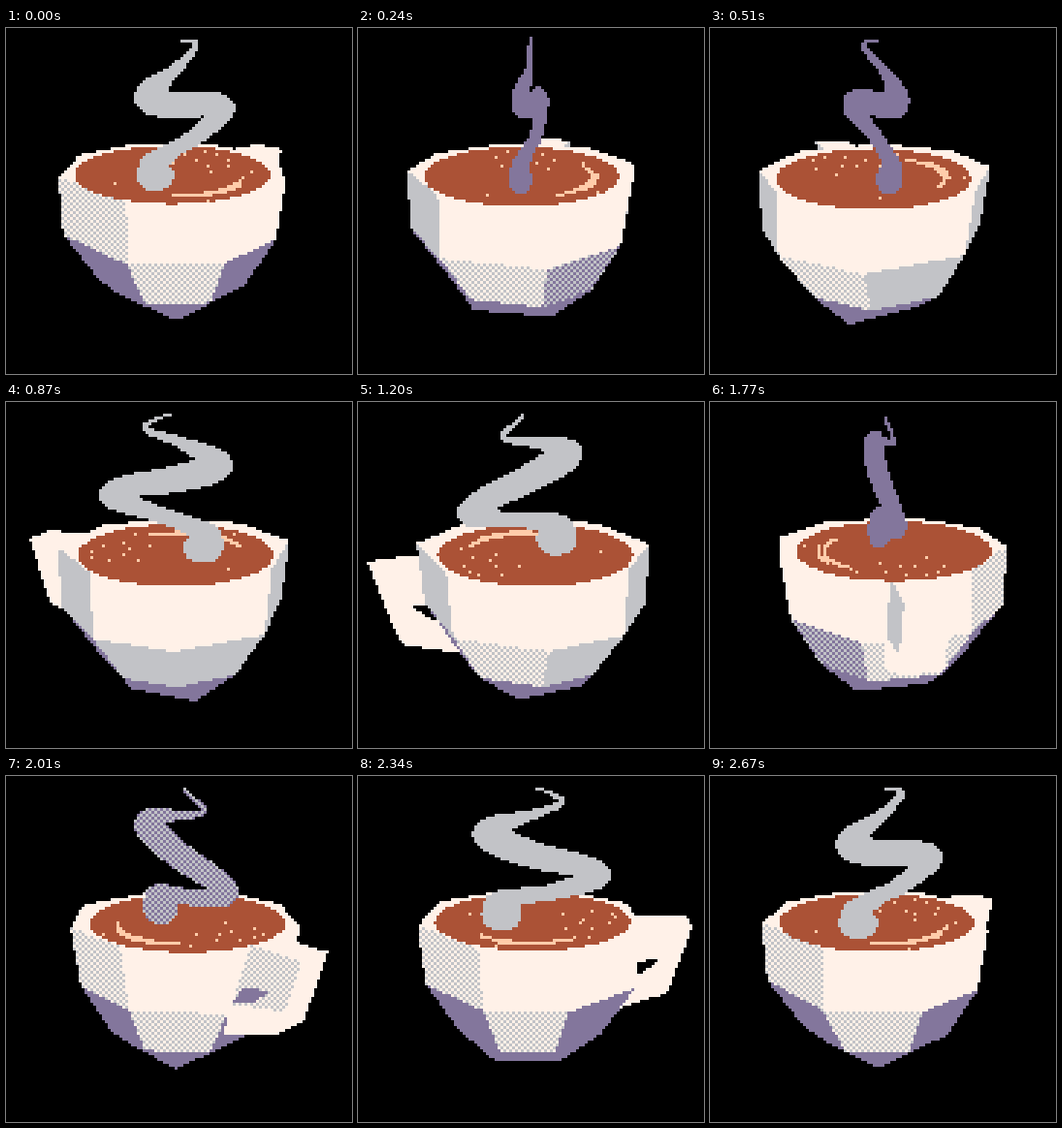
Write an HTML page with a canvas that moves like this. It is 357 by 357 pixels and loops after 2700 ms.

```html
<!DOCTYPE html>
<html lang="en">
<head>
<meta charset="utf-8">
<title>Coffee cup</title>
<style>
  html, body { margin: 0; width: 100%; height: 100%; overflow: hidden; background: #000; }
  canvas { display: block; width: 100vw; height: 100vh; image-rendering: pixelated; }
</style>
</head>
<body>
<canvas id="cup" width="119" height="119"></canvas>
<script>
const N = 119, CELL = 3, STEP = 30, STEPS = 90;
const ctx = document.getElementById('cup').getContext('2d');
const img = ctx.createImageData(N, N);
const px = new Uint32Array(img.data.buffer);

// Colours are stored as ABGR; a paint is a checkerboard pair.
const BLACK = 0xff000000, WHITE = 0xffe8f1ff, GREY = 0xffc7c3c2;
const PURPLE = 0xff9c7683, BROWN = 0xff3652ab, PEACH = 0xffaaccff;
const solid = c => [c, c];
const white = solid(WHITE), grey = solid(GREY), purple = solid(PURPLE);
const pale = [GREY, WHITE], dusk = [PURPLE, GREY];

const rad = d => d * Math.PI / 180;
const sin = d => Math.sin(rad(d)), cos = d => Math.cos(rad(d));
const wrap = d => ((d + 180) % 360 + 360) % 360 - 180;

const CX = 178, CY = 214.5, DEPTH = 600, PITCH = 0.375;
const SWAY = 7, SWAY_AT = -138, BEND = 4.5;
const HANDLE_AT = 134, HANDLE_T = 19;

// Rings: radius, height, sway.
const RIM = [119, 70, SWAY], MID = [112, 11.5, 11], LOW = [78, -37, SWAY];
const FOOT = [[43, 2], [43, 93], [53, -169], [58, -98]];
const DITHER_LIMIT = [23, 23, 23, 20, 27, 17, 24, 20];

// Handle outlines: radius, height.
const PROFILE = [[108, 67], [162, 66], [137, -1], [75, -22]];
const BAR = [[84, 8], [145, 20], [137, -1], [75, -22]];
const HOLE = [[130, 33], [100, 28], [84, 8], [112, 18]];

// Steam spine: height, sideways at 0 deg, sideways at 90 deg, radius.
const STEAM = [
  [13, 5, -7, 1], [24, 17, -25, 3], [32, 16, -24, 4], [42, -3, 4, 7],
  [52, -24, 24, 13], [64, -26, 28, 17], [80, 2, 0, 16], [94, 38, -42, 14],
  [106, 44, -50, 13], [118, 20, -18, 10], [124, -5, 5, 10],
  [132, -23, 20, 14], [146, -23, 18, 19]
];
const FOAM = [
  [157, .85], [133, .8], [150, .52], [147, .85], [131, .5], [118, .66],
  [170, .7], [104, .4], [-63, .67], [24, .93], [178, .4], [95, .8]
];

let turn = 0;

function plot(x, y, paint) {
  if (x >= 0 && y >= 0 && x < N && y < N) px[y * N + x] = paint[(x + y) & 1];
}
const dot = (x, y, paint) => plot(Math.floor(x / CELL), Math.floor(y / CELL), paint);

function fill(pts, paint) {
  for (let row = 0; row < N; row++) {
    const y = (row + 0.5) * CELL, cuts = [];
    pts.forEach(([x1, y1], i) => {
      const [x2, y2] = pts[(i + 1) % pts.length];
      if ((y1 <= y) !== (y2 <= y)) cuts.push(x1 + (y - y1) / (y2 - y1) * (x2 - x1));
    });
    cuts.sort((a, b) => a - b);
    for (let i = 0; i + 1 < cuts.length; i += 2) {
      const end = cuts[i + 1] / CELL - 0.5;
      for (let x = Math.ceil(cuts[i] / CELL - 0.5); x < end; x++) plot(x, row, paint);
    }
  }
}

const facing = pts => pts.reduce((sum, [x, y], i) => {
  const [u, v] = pts[(i + 1) % pts.length];
  return sum + x * v - u * y;
}, 0) > 0;
const face = (pts, paint) => { if (facing(pts)) fill(pts, paint); };

function project(x, h, z, cx = CX) {
  const k = DEPTH / (DEPTH - z);
  return [cx + x * k, CY - (h - z * PITCH) * k];
}

// Polar point on the turning cup; t shifts it along the tangent.
function spot(r, a, h, t = 0, sway = SWAY) {
  const f = a + turn, lean = turn + SWAY_AT;
  return project(r * sin(f) + t * cos(f) + sway * sin(lean), h,
                 r * cos(f) - t * sin(f) + sway * cos(lean));
}

const ring = ([r, h, sway]) => Array.from({ length: 8 }, (_, j) => {
  const a = 45 * j - 22.5;
  return spot(r, a + BEND * cos(2 * a), h, 0, sway);
});

function hull(pts) {
  const half = list => {
    const out = [];
    for (const p of list) {
      while (out.length > 1) {
        const [a, b] = out.slice(-2);
        if ((b[0] - a[0]) * (p[1] - a[1]) - (b[1] - a[1]) * (p[0] - a[0]) > 0) break;
        out.pop();
      }
      out.push(p);
    }
    return out.slice(0, -1);
  };
  const sorted = [...pts].sort((a, b) => a[0] - b[0] || a[1] - b[1]);
  return [...half(sorted), ...half([...sorted].reverse())];
}

function wallPaint(a) {
  const d = Math.abs(wrap(a - 4));
  return d < 44 ? white : d < 57 ? pale : grey;
}

function bowlPaint(j) {
  const d = Math.abs(wrap(45 * j + turn));
  return d < DITHER_LIMIT[j] ? pale : d < 32 ? grey : d < 38 ? dusk : purple;
}

function band(top, bottom, paintOf) {
  for (let j = 0; j < 8; j++) {
    const n = (j + 1) % 8;
    face([top[j], top[n], bottom[n], bottom[j]], paintOf(j));
  }
}

function drawHandle() {
  const f = turn + HANDLE_AT;
  const side = (list, t) => list.map(([r, h]) => spot(r, HANDLE_AT, h, t));
  const near = side(PROFILE, -HANDLE_T), far = side(PROFILE, HANDLE_T);
  const gap = solid(cos(f) > 0.5 ? PURPLE : BLACK);
  const plate = (pts, t, paint) => {
    if (!facing(pts)) return;
    fill(pts, paint);
    fill(side(BAR, t), white);
    if (cos(f) < 0.85) fill(side(HOLE, t), gap);
  };
  plate(near, -HANDLE_T, wallPaint(f - 90));
  plate([...far].reverse(), HANDLE_T, wallPaint(f + 90));
  for (let i = 0; i < 2; i++) face([near[i], far[i], far[i + 1], near[i + 1]], white);
}

function drawBody() {
  const rim = ring(RIM), mid = ring(MID), low = ring(LOW);
  const foot = FOOT.map(([r, a]) =>
    project(r * sin(a + turn), -65, r * cos(a + turn), 175));
  fill(hull([...low, ...foot]), purple);
  band(mid, low, bowlPaint);
  band(rim, mid, j => wallPaint(45 * j + turn));
  fill(rim, white);
}

function drawCoffee() {
  const lean = turn + SWAY_AT;
  const x = 179 + 11 * sin(lean), y = 154.5 + 4 * cos(lean), ry = 31 + 1.2 * cos(lean);
  const at = (a, r) => [x + 101 * r * sin(a), y + ry * r * cos(a)];
  fill(Array.from({ length: 36 }, (_, i) => at(i * 10, 1)), solid(BROWN));
  const foam = (a, r) => dot(...at(a + turn, r), solid(PEACH));
  for (let a = 0; a < 86; a += 1.5) {
    foam(a, 0.72);
    if (a > 22 && a < 66) foam(a, 0.77);
  }
  FOAM.forEach(([a, r]) => foam(a, r));
}

function spline(a, b, c, d, t) {
  return b.map((v, i) => v + 0.5 * t * (c[i] - a[i] +
    t * (2 * a[i] - 5 * v + 4 * c[i] - d[i] + t * (3 * (v - c[i]) + d[i] - a[i]))));
}

function stamp(x, y, rx, ry, paint) {
  dot(x, y, paint);
  for (let v = Math.floor((y - ry) / CELL); v <= (y + ry) / CELL; v++)
    for (let u = Math.floor((x - rx) / CELL); u <= (x + rx) / CELL; u++) {
      const dx = ((u + 0.5) * CELL - x) / rx, dy = ((v + 0.5) * CELL - y) / ry;
      if (dx * dx + dy * dy < 1) plot(u, v, paint);
    }
}

function drawSteam() {
  const open = cos(2 * (turn - 136));
  const paint = open > 0 ? grey : open > -0.45 ? dusk : purple;
  const wide = Math.min(1.1, 1 + 0.4 * open), last = STEAM.length - 1;
  for (let i = 0; i < last; i++) {
    const knots = [Math.max(0, i - 1), i, i + 1, Math.min(last, i + 2)].map(n => STEAM[n]);
    for (let t = 0; t <= 1; t += 0.05) {
      const [h, p, q, r] = spline(...knots, t);
      const x = 177 + p * cos(turn) + q * sin(turn);
      const y = h + PITCH * (q * cos(turn) - p * sin(turn));
      stamp(x, Math.max(y, 13), r * wide, r * 0.85, paint);
    }
  }
}

function draw(step) {
  turn = step * 360 / STEPS;
  px.fill(BLACK);
  const inFront = cos(turn + HANDLE_AT) > 0.5;
  if (!inFront) drawHandle();
  drawBody();
  if (inFront) drawHandle();
  drawCoffee();
  drawSteam();
  ctx.putImageData(img, 0, 0);
}

const start = performance.now();
let shown = -1;
function tick() {
  const step = Math.floor((performance.now() - start) / STEP) % STEPS;
  if (step !== shown) draw(shown = step);
  requestAnimationFrame(tick);
}
tick();
</script>
</body>
</html>
```
